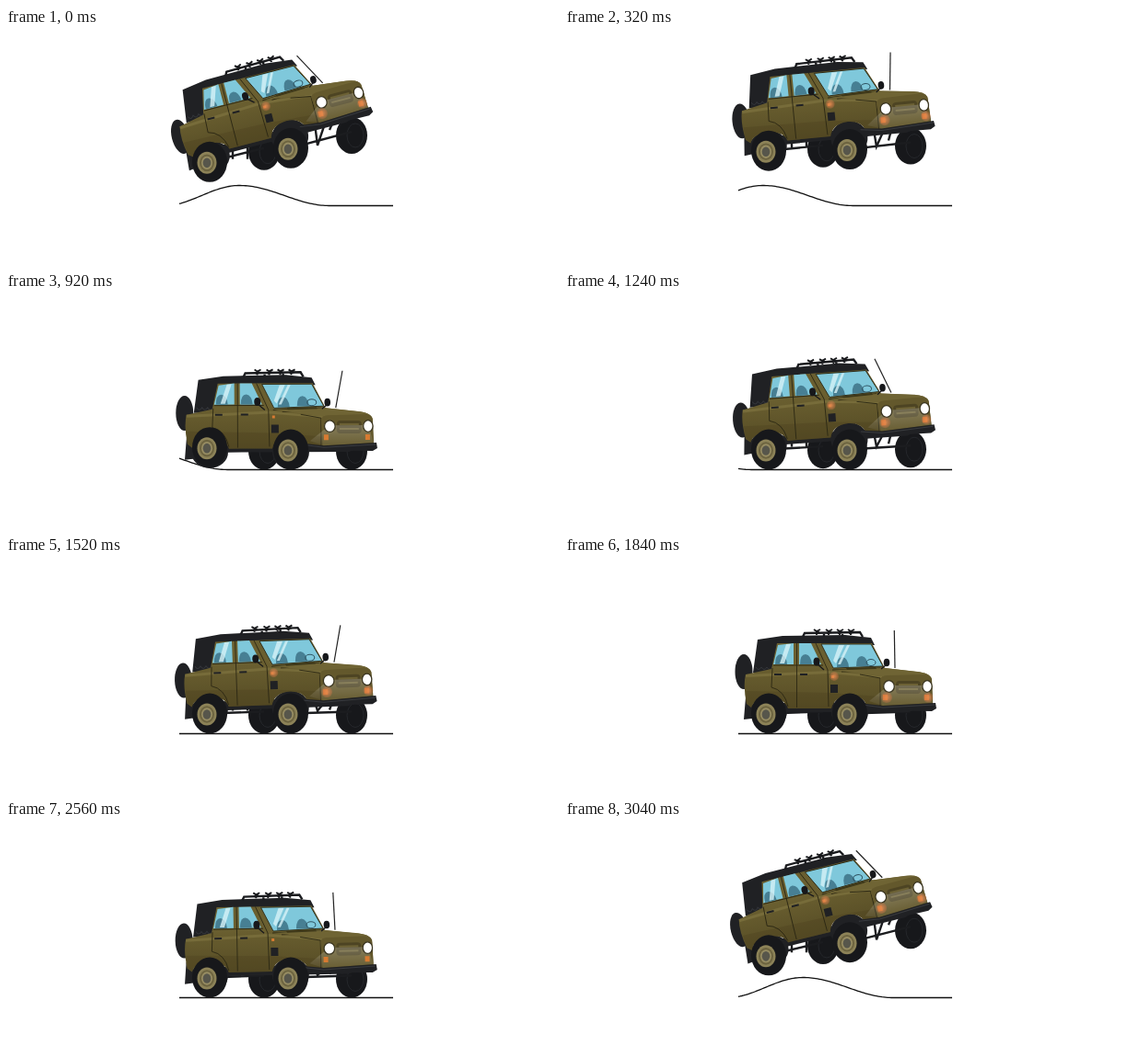
An HTML page for the animation above (3080 ms loop, 600 by 257 pixels).

```html
<!DOCTYPE html>
<html lang="en">
<head>
<meta charset="utf-8">
<title>Off-roader</title>
<style>
html, body { margin: 0; width: 100%; height: 100%; overflow: hidden; background: #fff; }
svg { display: block; width: 100vw; height: 100vh; }
.tyre { fill: #17181b; }
.dark { fill: #202124; }
.glass { fill: #7fc8db; }
.seat { fill: #477f93; }
.line { fill: none; stroke: #2c2814; stroke-width: .9; }
.rod { fill: none; stroke: #1b1c1f; stroke-width: 2.4; }
</style>
</head>
<body>
<svg viewBox="0 0 600 257">
  <defs>
    <linearGradient id="paint" x1="0" y1="0" x2="0" y2="1">
      <stop offset=".35" stop-color="#6a5f30"/>
      <stop offset="1" stop-color="#564c25"/>
    </linearGradient>
    <linearGradient id="beam" x1="0" y1="0" x2="0" y2="1">
      <stop offset="0" stop-color="#fff" stop-opacity=".22"/>
      <stop offset="1" stop-color="#fff" stop-opacity=".04"/>
    </linearGradient>
    <radialGradient id="halo">
      <stop offset=".2" stop-color="#e58a50" stop-opacity=".8"/>
      <stop offset="1" stop-color="#d9764a" stop-opacity=".25"/>
    </radialGradient>
    <g id="nearWheel">
      <ellipse class="tyre" cx="1" rx="19" ry="22"/>
      <g transform="translate(-2 1)">
        <ellipse rx="10.5" ry="12" fill="#8d8358"/>
        <ellipse rx="8" ry="9.3" fill="#6d6440"/>
        <ellipse rx="6" ry="7.2" fill="#978d63"/>
        <ellipse rx="4.3" ry="5.3" fill="#57564b"/>
      </g>
    </g>
    <g id="farWheel">
      <ellipse class="tyre" rx="17" ry="20"/>
      <ellipse cx="4" rx="9" ry="13" fill="none" stroke="#25272b"/>
    </g>
    <path id="lamp" d="M-4-3L-1-1L3-3M-1-1L-1 3M-3 1L2 0" fill="none" stroke="#17181b" stroke-width="1.9"/>
    <path id="seat" class="seat" d="M-6 0Q-6-11 0-11Q6-10 7 0Z"/>
  </defs>

  <path id="road" fill="none" stroke="#111" stroke-width="1.3"/>
  <use href="#farWheel" id="farRear"/>
  <use href="#farWheel" id="farFront"/>
  <path id="axles" class="rod"/>

  <g id="body">
    <ellipse id="spare" class="dark" cx="194" cy="126" rx="9.5" ry="19"/>
    <path class="dark" d="M204 127L209 91L236 87L304 86L332 89L336 97L231 98L226 127Z"/>
    <path d="M207 121q3 5 6 0q3 5 6 0q3 5 6 0" fill="none" stroke="#33353a"/>
    <path class="rod" stroke-width="1.5" d="M258 88L260 84L320 83L323 88M281 84V88M301 84V88"/>
    <use href="#lamp" x="274" y="83"/><use href="#lamp" x="287" y="83"/>
    <use href="#lamp" x="299" y="83"/><use href="#lamp" x="311" y="83"/>

    <path class="dark" d="M196 154H204L203 177L194 178ZM236 160H330L400 160L372 170H240Z"/>
    <ellipse class="dark" cx="221" cy="170" rx="20" ry="17"/>
    <ellipse class="dark" cx="309" cy="170" rx="20" ry="19"/>
    <path fill="url(#paint)" d="M196 129L224 123L230 95L333 95L347 122L381 126Q396 127 398 134L399 161L345 165L328 163Q323 152 309 152Q292 153 289 166L242 166Q239 155 220 155Q205 156 202 165L197 161Q193 142 196 129Z"/>
    <path fill="#4a411d" opacity=".35" d="M196 147L286 149L342 153V164L328 163Q322 151 308 152Q292 153 289 166L242 166Q238 154 219 155Q206 155 202 164L197 160Z"/>
    <path fill="#776c3a" d="M196 129L286 125L344 131V133L286 128L196 132Z"/>

    <path class="glass" d="M231 97L248 95V118H226ZM254 95H267L278 118H254ZM278 96H332L345 120L291 122Z"/>
    <use href="#seat" x="234" y="118"/><use href="#seat" x="261" y="118"/>
    <use href="#seat" x="301" y="121"/><use href="#seat" x="322" y="120"/>
    <path fill="#d8f3f8" opacity=".8" d="M240 96H245L238 117H233ZM297 97H303L294 117L291 114ZM306 97H309L299 118H296Z"/>
    <ellipse cx="332" cy="116" rx="5" ry="3.5" fill="none" stroke="#315563"/>
    <path class="line" d="M278 96H332L345 120L291 122ZM251.500 95V165M226 119H280M272 95L285 124L286 164"/>
    <path class="line" d="M225 122L224 143Q238 146 242 164M290 124L342 122M300 126L338 125M320 129L342 133V163"/>
    <path class="dark" d="M227 128h8v2h-8zM255 128h8v2h-8zM288 140h8v9h-8z"/>
    <path fill="#6f6434" d="M292 124L347 122L383 126Q394 128 394 130L350 132Z"/>
    <path fill="#3e3819" d="M305 122L337 121L338 123L306 124Z"/>

    <path fill="#63582c" d="M342 134Q344 130 350 130L391 129Q398 130 398 136L399 160L344 164Z"/>
    <rect x="359" y="136" width="27" height="14" rx="4" fill="#4d4423"/>
    <path d="M362 140H383M362 145H383" stroke="#6d6235" stroke-width="2"/>
    <path fill="url(#beam)" d="M351 141L393 141L399 160L345 163L330 158Z"/>
    <g fill="#fff" stroke="#3a3521" stroke-width="1.300">
      <ellipse cx="351.500" cy="142" rx="5.800" ry="6.300"/>
      <ellipse cx="393" cy="142" rx="5.200" ry="6.300"/>
    </g>
    <path fill="#d77b32" d="M345 151h5v6h-5zM390 151h5v6h-5zM289 130h3v3h-3z"/>
    <g id="glow" fill="url(#halo)">
      <circle cx="349" cy="154" r="6"/><circle cx="394" cy="154" r="5.500"/><circle cx="292" cy="131" r="5"/>
    </g>
    <path class="dark" d="M318 160L345 163L402 160L403 166L398 169L323 168Z"/>
    <path d="M322 162L345 165L401 162" fill="none" stroke="#393b3f"/>
    <ellipse class="tyre" cx="273" cy="115" rx="3.500" ry="4.500"/>
    <ellipse class="tyre" cx="349" cy="116" rx="3.300" ry="4.300"/>
    <path d="M274 118L281 124M348 119L343 123" stroke="#17181b" stroke-width="1.300"/>
    <path id="antenna" d="M358 122V81" stroke="#222" stroke-width="1.200"/>
  </g>

  <use href="#nearWheel" id="rear"/>
  <use href="#nearWheel" id="front"/>
</svg>
<script>
const LOOP = 3080, STEP = 40, GROUND = 193.5;
const LAUNCH = 2800; // moment the front wheels hit the bump
const PIVOT = { x: 351, y: 142 };
const $ = id => document.getElementById(id);
const clamp = v => Math.max(0, Math.min(1, v));

// Turning points of each swing: [ms after launch, value]
const lifts = [[0, -3], [280, -61], [440, -62], [1150, 5], [1500, -12], [2100, 0], [2440, 0]];
const pitches = [[0, -1.5], [280, -14.5], [920, 3.3], [1500, -4.2], [2100, 0], [2440, 0]];
const leans = [[0, -4], [240, -44], [920, 38], [1530, -26], [1760, 10], [2100, -1], [2440, -1]];

const wheels = [
  { id: 'rear', x: 220, y: 172, radius: 22, droop: 3 },
  { id: 'front', x: 308, y: 172, radius: 22, droop: 10 },
  { id: 'farRear', x: 280, y: 174, radius: 20, droop: 5 },
  { id: 'farFront', x: 375, y: 174, radius: 20, droop: 11 }
];

function swing(keys, time) {
  const i = keys.findLastIndex(key => key[0] <= time);
  const [t0, a] = keys[i], [t1, b] = keys[i + 1] || [LOOP, keys[0][1]];
  return a + (b - a) * (1 - Math.cos(Math.PI * (time - t0) / (t1 - t0))) / 2;
}

// The bump rushes in, then drifts by in slow motion.
const bumpEnd = time => 353 - 0.12 * (time - 240) + 230 * clamp(1 - time / 240) ** 2;

function roadY(x, end) {
  const d = x - (end - 95), reach = d < 0 ? 82 : 98;
  return Math.abs(d) < reach ? GROUND - 11 * (1 + Math.cos(Math.PI * d / reach)) : GROUND;
}

function place(id, x, y) {
  $(id).setAttribute('transform', `translate(${x} ${y})`);
}

function draw(t) {
  const time = (t - LAUNCH + LOOP) % LOOP;
  const lift = swing(lifts, time), pitch = swing(pitches, time), lean = swing(leans, time);
  const end = bumpEnd(time), angle = pitch * Math.PI / 180;

  let road = '';
  for (let x = 188; x <= 420; x += 2) road += `${road ? 'L' : 'M'}${x} ${roadY(x, end).toFixed(2)}`;
  $('road').setAttribute('d', road);

  $('body').setAttribute('transform',
    `translate(${0.63 * pitch} ${lift}) rotate(${pitch} ${PIVOT.x} ${PIVOT.y})`);
  $('antenna').setAttribute('transform', `rotate(${lean - pitch} 358 122)`);
  place('spare', 0, 14 * clamp(-pitch / 3));

  // Wheels hang from the body until the road stops them.
  const [rear, front, farRear, farFront] = wheels.map(({ id, x, y, radius, droop }) => {
    const hung = PIVOT.y + lift + (x - PIVOT.x) * Math.sin(angle) + (y - PIVOT.y) * Math.cos(angle);
    const height = Math.min(hung + droop, roadY(x, end) - radius);
    place(id, x, height);
    return height;
  });

  const chassis = 165 + lift;
  $('axles').setAttribute('d',
    `M220 ${rear}L280 ${farRear - 4}M308 ${front}L375 ${farFront - 4}` +
    `M335 ${chassis}L338 ${front - 3}L346 ${chassis}M354 ${chassis}L351 ${farFront - 6}` +
    `M246 ${rear - 18}V${rear - 3}M262 ${rear - 18}V${rear - 3}`);

  const blink = Math.cos(t / (LOOP / 8) * 2 * Math.PI);
  $('glow').setAttribute('opacity', clamp((blink + 0.4) * 2));
}

const start = performance.now();
function tick() {
  draw(Math.floor((performance.now() - start) % LOOP / STEP) * STEP);
  requestAnimationFrame(tick);
}
tick();
</script>
</body>
</html>
```
